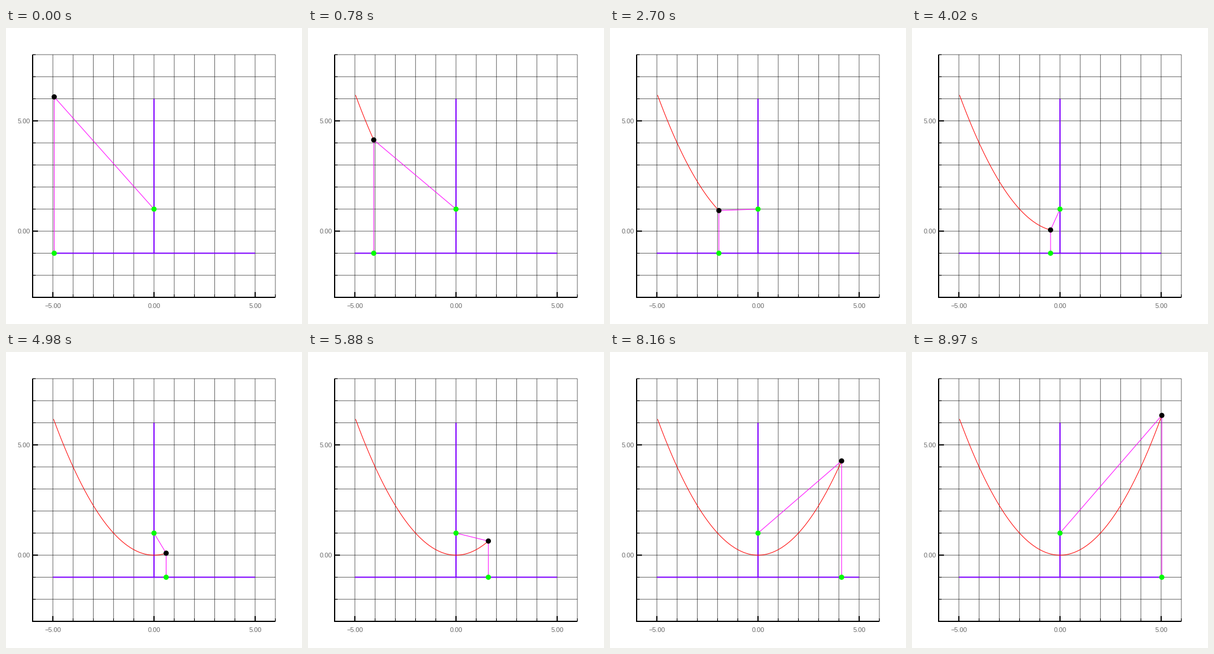
Write a matplotlib script that moves like this. It is 500 px wide and 500 px high and loops after 9000 ms.

```python
import numpy as np
import matplotlib.pyplot as plt
from matplotlib.animation import FuncAnimation
from matplotlib.patches import Circle

SIZE, DPI = 500, 100
FRAMES, INTERVAL = 300, 30
LEFT, RIGHT, TOP, BOTTOM = 45, 455, 45, 455
FOCUS, DIRECTRIX = 1, -1
PT = 72 / DPI  # points per pixel

plt.rcParams["font.family"] = "Liberation Sans"


def px(x):
    return LEFT + (np.asarray(x) + 6) * (RIGHT - LEFT) / 12


def py(y):
    return TOP + (8 - np.asarray(y)) * (BOTTOM - TOP) / 11


def parabola(x):
    return np.asarray(x) ** 2 / 4


fig = plt.figure(figsize=(SIZE / DPI, SIZE / DPI), dpi=DPI, facecolor="white")
ax = fig.add_axes([0, 0, 1, 1])
ax.set_xlim(0, SIZE)
ax.set_ylim(SIZE, 0)
ax.axis("off")


def line(xs, ys, color, width, z, **kw):
    # Unsnapped, so lines between pixels are antialiased
    return ax.plot(xs, ys, color=color, lw=width * PT, zorder=z, snap=False,
                   solid_capstyle="butt", **kw)[0]


def dot(x, y, color, z):
    return ax.add_patch(Circle((px(x), py(y)), 4.4, fc=color, lw=0, zorder=z))


def label(x, y, value, ha):
    text = f"{value:.2f}".replace("-", "\u2212")
    ax.text(x, y, text, ha=ha, va="center_baseline", fontsize=11 * PT,
            color="#666666")


def tick_size(v):
    return (9, 2) if v % 5 == 0 else (5, 1)


# Grid, ticks and labels
for v in range(-6, 7):
    x = px(v)
    line([x, x], [TOP, BOTTOM], "black", 1, 1, alpha=0.6)
    length, width = tick_size(v)
    line([x, x], [BOTTOM - length, BOTTOM], "black", width, 2)
    if v % 5 == 0:
        label(x, 469, v, "center")
for v in range(-3, 9):
    y = py(v)
    line([LEFT, RIGHT], [y, y], "black", 1, 1, alpha=0.6)
    length, width = tick_size(v)
    line([LEFT, LEFT + length], [y, y], "black", width, 2)
    if v % 5 == 0:
        label(41, y, v, "right")
line([LEFT, LEFT], [TOP, BOTTOM + 1], "black", 2, 2)
line([LEFT - 1, RIGHT], [BOTTOM, BOTTOM], "black", 2, 2)

# Directrix and axis of symmetry
VIOLET = "#7f00ff"
line(px([-5, 5]), py([DIRECTRIX] * 2), VIOLET, 2, 3)
line(px([0, 0]), py([DIRECTRIX, 6]), VIOLET, 2, 3)

trail = line([], [], "red", 1, 4)
rays = line([], [], "#ff00ff", 1, 5)
dot(0, FOCUS, "#00ff00", 6)
foot = dot(-5, DIRECTRIX, "#00ff00", 6)
point = dot(-5, parabola(-5), "black", 7)


def update(i):
    x = -5 + (i + 2) / 30
    y = parabola(x)
    path = np.linspace(-5 + 1 / 30, x, i + 2)
    trail.set_data(px(path), py(parabola(path)))
    rays.set_data(px([0, x, x]), py([FOCUS, y, DIRECTRIX]))
    foot.center = px(x), py(DIRECTRIX)
    point.center = px(x), py(y)
    return trail, rays, foot, point


anim = FuncAnimation(fig, update, frames=FRAMES, interval=INTERVAL,
                     repeat=True, repeat_delay=0, blit=False)
plt.show()
```
